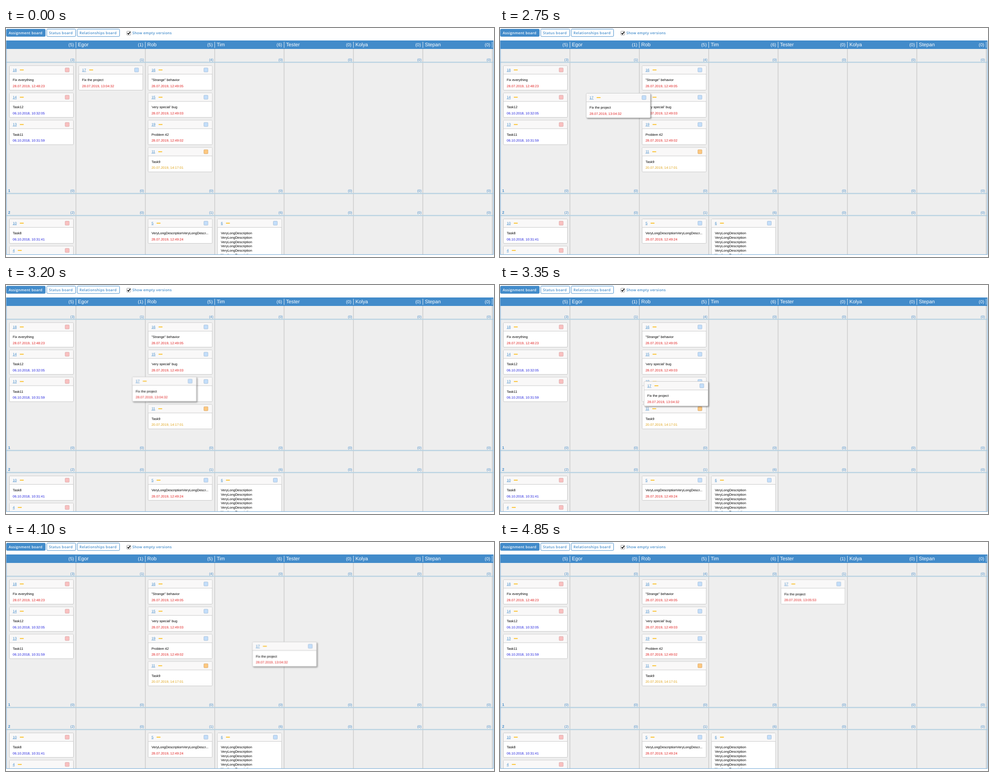
Animation, 1089 px wide and 514 px high, one loop 7300 ms. Source, as an HTML page:

```html
<!DOCTYPE html>
<html lang="en">
<head>
<meta charset="utf-8">
<title>Assignment board</title>
<style>
  html, body { margin: 0; width: 100%; height: 100%; overflow: hidden; background: #fff; }
  svg { display: block; width: 1089px; height: 514px; }
  text { font: 7.55px "Liberation Sans", Arial, sans-serif; text-rendering: geometricPrecision; white-space: pre; }
  .ui { font: 600 8px "Open Sans", sans-serif; letter-spacing: .32px; fill: #428bca; }
  .name { font-size: 11.2px; fill: #fff; }
  .total { font-size: 10px; fill: #fff; text-anchor: end; }
  .count { font-size: 7.8px; fill: #428bca; text-anchor: end; }
  .row { font-size: 8.5px; font-weight: bold; fill: #428bca; }
  .id { font-size: 8px; fill: #428bca; }
  .before, .after, #drag { animation: 7.3s step-end infinite; }
  .before { animation-name: before; }
  .after { animation-name: after; }
  #drag { animation-name: drag; }
</style>
</head>
<body>
<svg id="stage" viewBox="0 0 1089 514" xmlns="http://www.w3.org/2000/svg"></svg>
<script>
const LOOP = 7300, START = 2450, STEP = 150, DROP = 4550, SAVED = 4850;
const PITCH = 154.83, BLUE = '#428bca';
const RED = '#e02020', NAVY = '#2222dd', GOLD = '#dfa51c';
const PINK = ['#f9c0c0', '#dba8a8'], SKY = ['#c3defa', '#a6bfd8'], ORANGE = ['#fdc880', '#d9aa6c'];

const rect = (x, y, w, h, fill, more = '') =>
  `<rect x="${x}" y="${y}" width="${w}" height="${h}" fill="${fill}" ${more}/>`;
const text = (x, y, str, cls = '', fill = '') =>
  `<text x="${x}" y="${y}" class="${cls}"${fill && ` style="fill:${fill}"`}>${str}</text>`;
const colX = i => i * PITCH;

// A value that changes once the move has been saved
const swap = (x, y, cls, from, to, fill) => from === to
  ? text(x, y, from, cls, fill)
  : text(x, y, from, cls + ' before', fill) + text(x, y, to, cls + ' after', fill);

function card(col, y, id, [fill, edge], title, date, color, saved = date, h = 54.8) {
  const lines = [].concat(title);
  const wide = id === 11 ? 8.2 : String(id).length * 4.45;
  const last = 34.6 + (lines.length - 1) * 9.67;
  return `<g transform="translate(${7.5 + colX(col)} ${y})">`
    + rect(0, 0, 143, h, '#fff', 'rx="1.5" stroke="#c6c6c6"')
    + rect(.5, .5, 142, 18, '#f9f8f8')
    + rect(0, 18.4, 143, 1, '#c8c8c8')
    + text(7.5, 12, id, 'id') + rect(7.5, 13, wide, .7, BLUE)
    + rect(wide + 14.5, 8.6, 8.6, 1.8, '#fbbc1c')
    + rect(124.5, 5, 9, 9, fill, `rx="1" stroke="${edge}" stroke-width=".9"`)
    + lines.map((line, i) => text(7.5, 34.6 + i * 9.67, line)).join('')
    + (date ? swap(7.5, last + 13.4, '', date, saved, color) : '')
    + '</g>';
}

function toolbar() {
  const button = (x, w, label, active) =>
    rect(x, 2.5, w, 16.5, active ? BLUE : '#fff', `rx="2" stroke="${BLUE}"`)
    + text(x + 5, 13.9, label, 'ui', active ? '#fff' : '');
  return button(1, 86.8, 'Assignment board', true)
    + button(91, 64.5, 'Status board')
    + button(159, 94.5, 'Relationships board')
    + rect(269.5, 7.3, 8.6, 8.6, '#fff', 'rx="1.2" stroke="#8a8a8a" stroke-width=".9"')
    + '<path d="M271.2 11.4l2 2.4 4.2-5.2" fill="none" stroke="#111" stroke-width="1.7"/>'
    + text(282, 13.9, 'Show empty versions', 'ui');
}

function grid() {
  const names = ['', 'Egor', 'Rob', 'Tim', 'Tester', 'Kolya', 'Stepan'];
  const totals = [[5, 1, 5, 6, 0, 0, 0], [5, 0, 5, 6, 1, 0, 0]];
  const rows = [
    [73.6, [3, 1, 4, 0, 0, 0, 0], [3, 0, 4, 0, 1, 0, 0]],
    [368, [0, 0, 0, 0, 0, 0, 0]],
    [417.3, [2, 0, 1, 6, 0, 0, 0]]
  ];
  let out = rect(0, 28, 1088, 480.5, '#eee');
  names.forEach((_, i) => out += rect(155.3 + colX(i), 47, 1.5, 461, '#cbcbcb'));
  for (const y of [75.7, 370.2, 419.7]) out += rect(1, y, 1086.5, 2.5, '#bad3e2');
  out += rect(.5, 28, 1087.5, 19, BLUE) + rect(.5, 47, 1, 461.5, '#6ea6d4');
  names.forEach((name, i) => {
    const x = colX(i);
    out += rect(155.5 + x, 31, 1.1, 13.5, '#d5e5f2')
      + text(5.7 + x, 41.1, name, 'name')
      + swap(151.6 + x, 40.8, 'total', `(${totals[0][i]})`, `(${totals[1][i]})`);
    for (const [y, from, to = from] of rows)
      out += swap(153.1 + x, y, 'count', `(${from[i]})`, `(${to[i]})`);
  });
  return out + text(4.7, 368, 1, 'row') + text(4.7, 417.3, 2, 'row');
}

function cards() {
  const long = 'VeryLongDescription';
  return card(0, 84.7, 18, PINK, 'Fix everything', '28.07.2019, 12:48:23', RED)
    + card(0, 145.9, 14, PINK, 'Task12', '06.10.2018, 10:32:05', NAVY)
    + card(0, 207.1, 13, PINK, 'Task11', '06.10.2018, 10:31:59', NAVY)
    + card(2, 84.7, 16, SKY, '"Strange" behavior', '28.07.2019, 12:49:05', RED)
    + card(2, 145.9, 15, SKY, "'very special' bug", '28.07.2019, 12:49:03', RED)
    + card(2, 207.1, 19, SKY, 'Problem 42', '28.07.2019, 12:49:02', RED)
    + card(2, 268.2, 11, ORANGE, 'Task9', '20.07.2019, 14:17:01', GOLD)
    + card(0, 428.6, 10, PINK, 'Task8', '06.10.2018, 10:31:41', NAVY)
    + card(0, 489.8, 4, PINK, 'Task2', '06.10.2018, 10:30:52', NAVY)
    + card(2, 428.6, 5, SKY, 'VeryLongDescriptionVeryLongDescr...', '28.07.2019, 12:49:24', RED)
    + card(3, 428.6, 6, SKY, Array(7).fill(long), '', RED, '', 110);
}

// Offsets of the dragged card from its first cell, one per step
const path = [
  [-.6, 10.6], [9, 32], [30, 62], [56.4, 89.6], [86, 108], [119.5, 121.6], [159, 132],
  [203, 138.5], [248, 141.6], [294, 142.5], [341, 141.6], [387.6, 139.7], [425.5, 135], [464.5, 133]
];
const pct = ms => (100 * ms / LOOP).toFixed(4) + '%';
const pose = (ms, x, y, shadow) =>
  `${pct(ms)}{transform:translate(${x}px,${y}px);filter:${shadow ? 'drop-shadow(2px 2px 1.5px rgba(0,0,0,.35))' : 'none'}}`;

const style = document.createElement('style');
style.textContent = '@keyframes drag{' + pose(0, 0, 0)
  + path.map(([x, y], i) => pose(START + i * STEP, x, y, true)).join('')
  + pose(DROP, 3 * PITCH, 0) + pose(LOOP, 3 * PITCH, 0) + '}'
  + `@keyframes before{0%{opacity:1}${pct(SAVED)},100%{opacity:0}}`
  + `@keyframes after{0%{opacity:0}${pct(SAVED)},100%{opacity:1}}`;
document.head.append(style);

document.getElementById('stage').innerHTML =
  '<clipPath id="view"><rect width="1089" height="508.3"/></clipPath>'
  + toolbar() + grid()
  + `<g clip-path="url(#view)">${cards()}</g>`
  + rect(.5, 508, 1087.5, 1, '#6ea6d4') + rect(1087, 28, 1, 481, '#6ea6d4')
  + '<g id="drag">'
  + card(1, 84.7, 17, SKY, 'Fix the project', '28.07.2019, 13:04:32', RED, '28.07.2019, 13:05:53')
  + '</g>';
</script>
</body>
</html>
```
